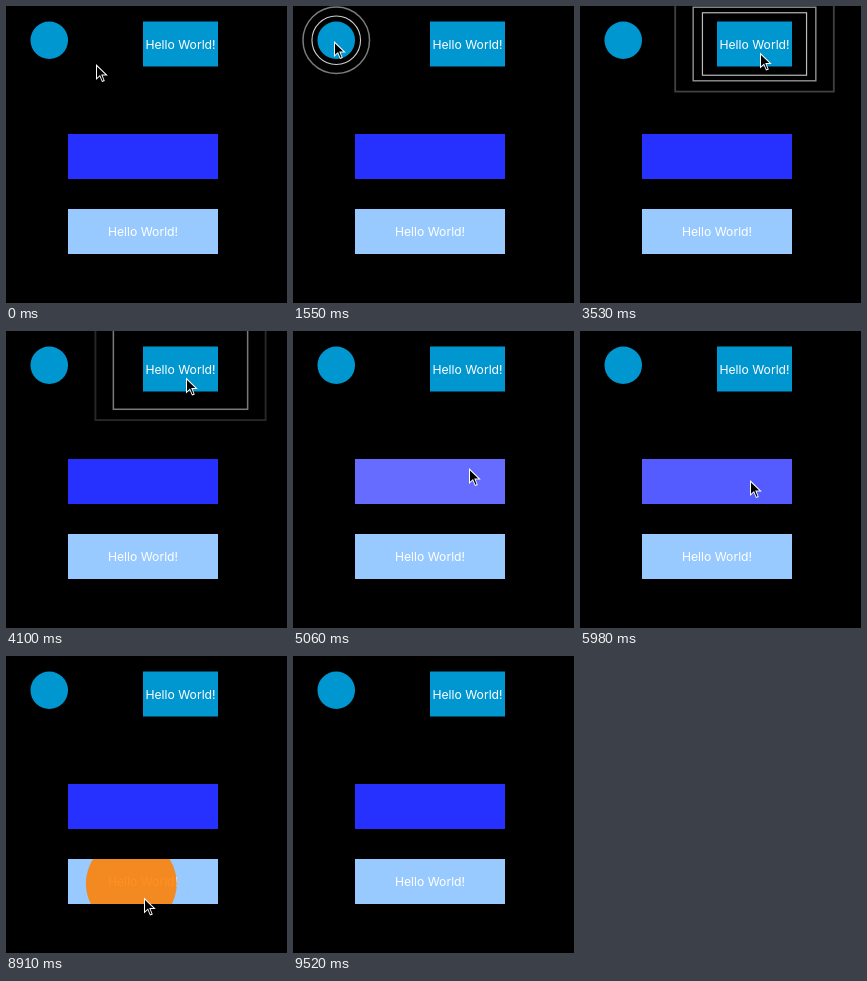
These frames come from a looping animation (281x297 px, 9.85 s). An HTML page:

```html
<!DOCTYPE html>
<html lang="en">
<head>
<meta charset="utf-8">
<title>Tap effects</title>
<style>
  html, body { margin: 0; width: 100%; height: 100%; overflow: hidden; background: #000; }
  svg { display: block; width: 281px; height: 297px; }
  text { font: 12.2px Inter, "Open Sans", sans-serif; fill: #fff; text-anchor: middle; }
  .ring { fill: none; stroke: #fff; stroke-width: .85; }
</style>
</head>
<body>
<svg viewBox="0 0 281 297">
  <defs>
    <clipPath id="panel"><rect x="62" y="203" width="150" height="45"/></clipPath>
  </defs>
  <circle cx="43.25" cy="34.25" r="18.75" fill="#0096cf"/>
  <rect x="137" y="15.5" width="75" height="45" fill="#0096cf"/>
  <text x="174.5" y="42.6">Hello World!</text>
  <g id="rings"></g>
  <rect x="62" y="128" width="150" height="45" fill="#2630ff"/>
  <rect id="flash" x="62" y="128" width="150" height="45" fill="#fff" opacity="0"/>
  <rect x="62" y="203" width="150" height="45" fill="#98caff"/>
  <text x="137" y="230.4">Hello World!</text>
  <g clip-path="url(#panel)"><circle id="blob" fill="#ff8000" opacity="0"/></g>
  <g id="cursor">
    <path fill="#fff" d="M0 0V16L3.7 12.6 6 18 8.8 16.9 6.6 11.6H11.8Z"/>
    <path fill="#000" d="M1 2.4V13.7L4 10.9 6.4 16.7 7.6 16.2 5.2 10.5H9.3Z"/>
  </g>
</svg>
<script>
const LOOP = 9850;
const MOVE = 160;
const RING = { life: 970, gap: 310, grow: 1.5 };
const FLASH = { life: 400, peak: 0.45, taps: [4920, 5770, 6420] };
const BLOB = { life: 390, r: 14.8, speed: 0.6, dx: 12.7, dy: 14, taps: [7630, 8190, 8860] };

// each pointer move: start time, x, y of where the tip ends up
const home = { x: 90, y: 58 };
const moves = [
  [650, 41, 35], [2080, 202, 53], [2570, 180, 46.5], [4390, 176, 137],
  [5700, 170, 149], [6780, 146, 225], [7850, 142, 235], [8460, 138, 241.5],
  [9070, 241, 292], [9390, 247, 298]
];

const byId = id => document.getElementById(id);
const flash = byId("flash"), blob = byId("blob"), cursor = byId("cursor");
const ease = u => u * u * (3 - 2 * u);
const clamp = u => Math.min(1, Math.max(0, u));

function set(el, attrs) {
  for (const key in attrs) el.setAttribute(key, attrs[key]);
}

function addRings(tap, tag, shape, cx, cy) {
  return [tap, tap + RING.gap].map(start => {
    const el = document.createElementNS("http://www.w3.org/2000/svg", tag);
    set(el, { class: "ring", ...shape });
    byId("rings").append(el);
    return { el, start, cx, cy };
  });
}

const round = { r: 18.75 };
const box = { x: -37.5, y: -22.5, width: 75, height: 45 };
const rings = [
  ...addRings(1050, "circle", round, 43.25, 34.25),
  ...addRings(2810, "rect", box, 174.5, 38),
  ...addRings(3280, "rect", box, 174.5, 38)
];

function pointerAt(t) {
  let { x, y } = home;
  for (const [start, toX, toY] of moves) {
    const k = ease(clamp((t - start) / MOVE));
    x += (toX - x) * k;
    y += (toY - y) * k;
  }
  return { x, y };
}

const activeTap = ({ taps, life }, t) => taps.find(s => t >= s && t < s + life);

function drawRing({ el, start, cx, cy }, t) {
  const p = (t - start) / RING.life;
  const on = p >= 0 && p < 1;
  set(el, {
    opacity: on ? 1 - p : 0,
    transform: `translate(${cx} ${cy}) scale(${on ? 1 + RING.grow * p : 1})`
  });
}

function drawFlash(t) {
  const tap = activeTap(FLASH, t);
  set(flash, { opacity: tap ? FLASH.peak * (1 - (t - tap) / FLASH.life) : 0 });
}

function drawBlob(t) {
  const tap = activeTap(BLOB, t);
  if (!tap) return set(blob, { opacity: 0 });
  const { x, y } = pointerAt(tap), age = t - tap;
  set(blob, {
    cx: x - BLOB.dx,
    cy: y - BLOB.dy,
    r: BLOB.r + BLOB.speed * age,
    opacity: 1 - age / BLOB.life
  });
}

function draw(t) {
  rings.forEach(ring => drawRing(ring, t));
  drawFlash(t);
  drawBlob(t);
  const { x, y } = pointerAt(t);
  set(cursor, { transform: `translate(${x} ${y})` });
}

const begin = performance.now();
function tick() {
  draw((performance.now() - begin) % LOOP);
  requestAnimationFrame(tick);
}
tick();
</script>
</body>
</html>
```
